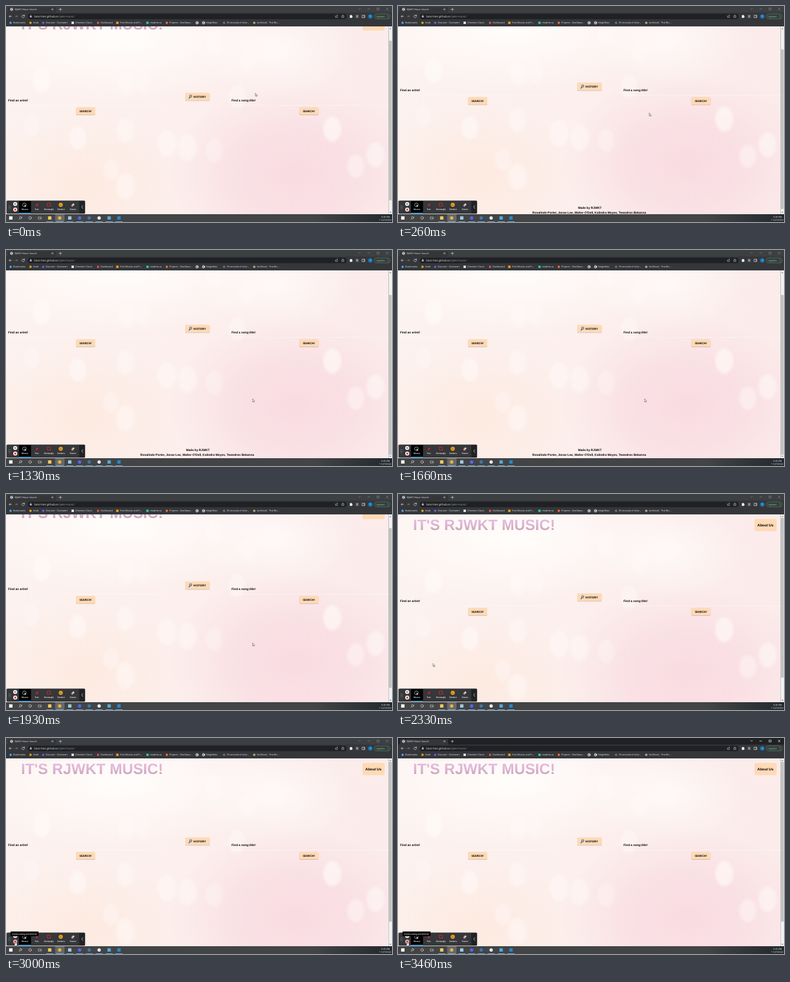
These frames come from a looping animation (640 px wide and 360 px high, 3.53 s). An HTML page:

```html
<!DOCTYPE html>
<html lang="en">
<head>
<meta charset="utf-8">
<title>RJWKT Music Search</title>
<style>
html, body { margin: 0; width: 100%; height: 100%; overflow: hidden; background: #202124; }
svg { display: block; width: 640px; height: 360px; }
text { font-family: "Open Sans", sans-serif; text-rendering: geometricPrecision; white-space: pre; }
.page text { font-family: "Liberation Sans", Arial, sans-serif; font-weight: 700; font-size: 5px; }
.page .btn { font-family: "Open Sans", sans-serif; font-size: 4.6px; letter-spacing: .15px; }
.page .title { font-size: 24.9px; }
.page .about { font-size: 6px; }
.line { fill: none; stroke: #dcdee0; stroke-width: .7; stroke-linecap: round; stroke-linejoin: round; }
.marks text { font-size: 3.85px; fill: #e8eaed; }
.tools text { font-size: 3.4px; font-weight: 600; fill: #fff; text-anchor: middle; }
</style>
</head>
<body>
<svg viewBox="0 0 640 360" xmlns="http://www.w3.org/2000/svg">
  <defs>
    <linearGradient id="base">
      <stop offset="0" stop-color="#fcf2ef"/><stop offset=".45" stop-color="#fcefed"/><stop offset="1" stop-color="#fbebeb"/>
    </linearGradient>
    <radialGradient id="rose"><stop offset="0" stop-color="#f9dbe1"/><stop offset=".5" stop-color="#f9dde2" stop-opacity=".75"/><stop offset="1" stop-color="#f9dfe4" stop-opacity="0"/></radialGradient>
    <radialGradient id="peach"><stop offset="0" stop-color="#fdeae0"/><stop offset="1" stop-color="#fdeae0" stop-opacity="0"/></radialGradient>
    <radialGradient id="glow"><stop offset="0" stop-color="#fffdfb"/><stop offset="1" stop-color="#fffdfb" stop-opacity="0"/></radialGradient>
    <linearGradient id="ink" x2="0" y2="1">
      <stop offset=".1" stop-color="#eabce3"/><stop offset=".5" stop-color="#dab3d2"/><stop offset=".9" stop-color="#c5a2b1"/>
    </linearGradient>
    <linearGradient id="bar"><stop offset=".8" stop-color="#424446"/><stop offset="1" stop-color="#22282d"/></linearGradient>
    <filter id="soft" x="-30%" y="-30%" width="160%" height="160%"><feGaussianBlur stdDeviation="2.2"/></filter>
    <filter id="lift" x="-20%" y="-30%" width="140%" height="180%"><feDropShadow dx="0" dy=".7" stdDeviation=".6" flood-color="#7a5a50" flood-opacity=".45"/></filter>
    <clipPath id="view"><rect y="34" width="634.5" height="313"/></clipPath>
  </defs>

  <g clip-path="url(#view)">
    <g id="page" class="page">
      <rect y="34" width="635" height="356" fill="url(#base)"/>
      <ellipse cx="130" cy="320" rx="190" ry="130" fill="url(#peach)"/>
      <ellipse cx="480" cy="300" rx="210" ry="150" fill="url(#rose)"/>
      <ellipse cx="190" cy="75" rx="290" ry="110" fill="url(#glow)"/>
      <ellipse cx="450" cy="95" rx="130" ry="80" fill="url(#glow)" opacity=".7"/>
      <g id="bokeh" fill="#fffaf8" filter="url(#soft)"></g>
      <text class="title" x="25" y="60.3" fill="url(#ink)">IT'S RJWKT MUSIC!</text>
      <path d="M0 186.7H265M374 186.7H635" stroke="#fff" stroke-width=".8" opacity=".55"/>
      <text x="3.6" y="180.3">Find an artist!</text>
      <text x="373.9" y="180.3">Find a song title!</text>
      <g id="buttons"></g>
      <path d="M304.8 173.2l-1.6 1.8" stroke="#3b3b40" stroke-width="1.1" stroke-linecap="round"/>
      <circle cx="306.3" cy="171.3" r="1.9" fill="#8cc8f0" stroke="#3b3b40" stroke-width=".7"/>
      <g text-anchor="middle">
        <text x="318" y="376.3">Made by RJWKT</text>
        <text x="317" y="383.8">Rosalinde Porter, Jonas Lee, Walter O'Dell, Kalindra Moyes, Tewodros Bekanna</text>
      </g>
    </g>
  </g>

  <rect x="634.5" y="34" width="5.5" height="313" fill="#f1f1f1"/>
  <path d="M635.9 38.2l1.4-1.7 1.4 1.7zM635.9 343l1.4 1.7 1.4-1.7z" fill="#606060"/>
  <rect id="thumb" x="635" y="40" width="4.5" height="266" fill="#c1c1c1"/>

  <rect id="frame" width="640" height="11"/>
  <path d="M1 11q2 0 2-2V4q0-2 2-2H81q2 0 2 2V9q0 2 2 2z" fill="#35363a"/>
  <rect y="11" width="640" height="23" fill="#35363a"/>
  <g class="line">
    <path d="M75.8 4.4l2.4 2.4m0-2.4l-2.4 2.4M88.3 5.6h3.8m-1.9-1.9v3.8"/>
    <path d="M9.3 17.3H5.2m1.8-1.8l-1.8 1.8 1.8 1.8"/>
    <path d="M15 17.3h4.1m-1.8-1.8l1.8 1.8-1.8 1.8" stroke="#85878a"/>
    <path d="M30.4 16a2.2 2.2 0 1 0 .3 1.9M30.7 14.7v1.6h-1.6"/>
  </g>
  <g id="globes" class="line"></g>
  <rect x="36" y="12.7" width="529" height="9.3" rx="4.65" fill="#202124"/>
  <rect x="39.6" y="16.6" width="3" height="2.5" rx=".4" fill="#bdc1c6"/>
  <g class="line">
    <path d="M40.2 16.5v-.7a.9.9 0 0 1 1.8 0v.7" stroke="#bdc1c6" stroke-width=".5"/>
    <path d="M546.3 16.2v2.9h3.6v-1.2M547.4 17.5q.2-1.9 2.4-1.9m-1-1l1.1 1-1.1 1" stroke-width=".5"/>
    <path d="M558.5 14.9l.7 1.7 1.8.1-1.4 1.1.5 1.8-1.6-1-1.6 1 .5-1.8-1.4-1.1 1.8-.1z" stroke-width=".5"/>
    <path d="M580.5 15.7h3.5m-3.5 1.6h2m-2 1.6h2m1.2-2v2.4"/>
    <path d="M590.6 15.3h4.3v4h-4.3zM593.8 15.4v3.8"/>
  </g>
  <path d="M570 15.6h1.2a.8.8 0 0 1 1.6 0h1.2v1.3a.8.8 0 0 1 0 1.6v1.2h-4z" fill="#e8eaed"/>
  <circle cx="604" cy="17.3" r="3.6" fill="#1677b8"/>
  <text x="604" y="18.8" font-size="4" fill="#fff" text-anchor="middle">T</text>
  <rect x="611" y="13.2" width="26" height="8.2" rx="4.1" fill="#333e3b" stroke="#6f9f80" stroke-width=".5"/>
  <text x="614" y="18.8" font-size="4" fill="#8fcaa2">Update</text>
  <path d="M633.4 15.5v.1m0 1.7v.1m0 1.7v.1" stroke="#8fcaa2" stroke-width=".8" stroke-linecap="round"/>
  <text x="14.4" y="7.1" font-size="3.95" fill="#e8eaed">RJWKT Music Search</text>
  <text x="47" y="18.9" font-size="4.5" fill="#f1f3f4">boss-hen.github.io<tspan fill="#9aa0a6">/rjwkt-music/</tspan></text>
  <path id="win" class="line" d="M584.8 4l1.5 1.5 1.5-1.5M599.6 5h3.4M615.5 3.4h3.2v3.2h-3.2zM630.4 3.4l3.2 3.2m0-3.2l-3.2 3.2"/>
  <g id="marks" class="marks"></g>

  <rect y="347" width="640" height="13" fill="url(#bar)"/>
  <rect x="81.5" y="347" width="15.5" height="13" fill="#66696b"/>
  <g id="tasks"></g>
  <g class="line">
    <circle cx="24.4" cy="352.7" r="1.8"/><path d="M23.1 354.1l-1.5 1.6"/>
    <circle cx="40" cy="353.3" r="2.2"/>
    <path d="M53.8 351.8h3.4v3.2h-3.4zM58.6 351.6v.6m0 1.2v1.8" stroke-width=".6"/>
  </g>
  <g font-size="3.8" fill="#fff" text-anchor="end">
    <text x="636.5" y="352.6">9:35 PM</text><text x="639" y="358.4">11/27/2022</text>
  </g>

  <rect x="1" y="324.5" width="130" height="21.5" rx="1.5" fill="#35373a" stroke="#4b4d50" stroke-width=".5"/>
  <path d="M121.5 325H129.5q1.2 0 1.2 1.2V344.3q0 1.2-1.2 1.2H121.5z" fill="#202225"/>
  <rect x="21.5" y="325" width="20" height="20.5" fill="#000"/>
  <rect x="21.5" y="344.6" width="20" height="1.2" fill="#1d9bf0"/>
  <path d="M5 333v.1m0 2.3v.1m0 2.3v.1m2-4.9v.1m0 2.3v.1m0 2.3v.1" stroke="#aaa" stroke-width=".9" stroke-linecap="round"/>
  <circle cx="15.3" cy="330" r="3.3" fill="#fff"/>
  <path d="M14.5 328.7v2.6m1.6-2.6v2.6" stroke="#222" stroke-width=".8"/>
  <circle id="stop" cx="15.3" cy="339.2" r="3.3"/>
  <rect x="13.8" y="337.7" width="3" height="3" rx=".4" fill="#e2342d"/>
  <circle cx="30.5" cy="331.3" r="3" fill="none" stroke="#d9d9d9" stroke-width=".7"/>
  <path d="M30.4 330.5l3.8 3.4-2 .1-.9 1.8z" fill="#fff" stroke="#000" stroke-width=".3"/>
  <path d="M49 333.8l.6-2 2.8-2.6 1.3 1.4-2.7 2.7z" fill="#e5252a"/>
  <path d="M68.3 328.8h5.5v4.8h-5.5z" fill="none" stroke="#e5252a" stroke-width=".9"/>
  <circle cx="90.8" cy="331.3" r="3.4" fill="#f5a623"/>
  <path d="M89.6 330.2v.2m2.4-.2v.2m-2.9 1.6q1.7 1.7 3.4 0" fill="none" stroke="#5a3500" stroke-width=".6" stroke-linecap="round"/>
  <path d="M108.3 332.3l3.3-3.5 2.1 2-3.3 3.4h-1z" fill="#d8d8d8"/>
  <path d="M108.3 332.3l1.5-1.6 2.1 2-1.5 1.5h-1z" fill="#f08a8a"/>
  <path class="line" d="M127.4 332.6l-2 2.4 2 2.4" stroke-width="1"/>
  <g id="tools" class="tools"></g>
  <g id="tip">
    <rect x="7.5" y="322.6" width="46.5" height="7.6" rx=".8" fill="#000"/>
    <text x="30.7" y="327.7" font-size="3.15" font-weight="600" fill="#fff" text-anchor="middle">End Recording (Alt+Shift+R)</text>
  </g>
  <path id="arrow" d="M0 0V5.1L1.2 4 2 5.8 2.8 5.4 2 3.7H3.6z" fill="#fff" stroke="#222" stroke-width=".45"/>
  <path id="hand" d="M-.5 .4Q0-.4 .5 .4V2.4L2.6 3V5L1.9 6.8H-.7L-2 4.4-1.4 3.8-.5 4.5z" fill="#fff" stroke="#222" stroke-width=".4"/>
</svg>
<script>
const $ = id => document.getElementById(id);
const fill = (id, list, draw) => { $(id).innerHTML = list.map(draw).join(""); };

// Soft light spots: x, y, radius, opacity
fill("bokeh", [
  [59, 145, 15, .6], [119, 241, 14, .6], [198, 228, 15, .45], [267, 250, 16, .55], [301, 257, 16, .5],
  [345, 262, 14, .35], [198, 322, 16, .5], [174, 294, 13, .35], [199, 150, 15, .5], [228, 148, 14, .35],
  [541, 226, 15, .65], [580, 288, 14, .45], [613, 269, 15, .55], [383, 172, 14, .45], [345, 82, 16, .4],
  [400, 112, 14, .4], [42, 222, 13, .35]
], ([x, y, r, o]) => `<ellipse cx="${x}" cy="${y}" rx="${r}" ry="${r * 1.4}" opacity="${o}"/>`);

fill("buttons", [
  [591, 41.4, 36.8, 20.5, "About Us", 609.2, 53.8, "about", 3],
  [297, 165.7, 40.6, 12.6, "HISTORY", 321.2, 173.6, "btn", 1.6],
  [116.2, 189.7, 31.8, 12.4, "SEARCH!", 132, 197.5, "btn", 1.6],
  [486.4, 189.7, 31.8, 12.4, "SEARCH!", 502.2, 197.5, "btn", 1.6]
], ([x, y, w, h, label, tx, ty, kind, r]) =>
  `<rect x="${x}" y="${y}" width="${w}" height="${h}" rx="${r}" fill="#fedab6" ${kind === "btn" ? 'filter="url(#lift)"' : ""}/>
   <text class="${kind}" x="${tx}" y="${ty}" text-anchor="middle">${label}</text>`);

fill("globes", [[9.3, 5.6], [316.8, 28], [327.6, 28]], ([x, y]) =>
  `<circle cx="${x}" cy="${y}" r="2.2"/><ellipse cx="${x}" cy="${y}" rx="1" ry="2.2"/><path d="M${x - 2.2} ${y}h4.4"/>`);

// Bookmarks: text x, label, icon colour, round icon
fill("marks", [
  [12, "Bookmarks", "#4a9df0", 1], [45, "Vode", "#e5a00d", 1], [66, "Discover - Overseerr", "#6a5be0", 1],
  [115, "Checkers Chum", "#e8eaed", 0], [157, "Dashboard", "#d8564a", 1], [189, "Free Movies and Fr...", "#f29a1f", 0],
  [239, "readme.so", "#2fbf9b", 0], [271, "Projects - Dashboar...", "#ee6b2f", 1], [332, "NeighMoo"],
  [366, "30 seconds of inter...", "#6b6d72", 1], [416, "SortNook - The Wo...", "#b5a383", 1]
], ([x, label, color, round]) =>
  (color ? `<rect x="${x - 6.4}" y="26" width="4" height="4" rx="${round ? 2 : .3}" fill="${color}"/>` : "") +
  `<text x="${x}" y="29.4">${label}</text>`);

// Taskbar: x, colour, round, running
fill("tasks", [
  [8, "#fff", 0, 0], [72.5, "#f6ca5c", 0, 1], [89, "#e7b43c", 1, 1], [105.7, "#9fc9dc", 0, 1], [122, "#5865f2", 1, 1],
  [138, "#3f78a8", 1, 1], [154.4, "#e9e9ea", 1, 1], [171, "#58a7d8", 0, 1], [187.3, "#2489ca", 0, 1]
], ([x, color, round, open]) =>
  `<rect x="${x - 2.8}" y="350.4" width="5.6" height="5.6" rx="${round ? 2.8 : .3}" fill="${color}"/>` +
  (open ? `<rect x="${x - 6}" y="359.1" width="12" height=".9" fill="#76b9ed"/>` : ""));

fill("tools", ["Mouse", "Pen", "Rectangle", "Stickers", "Eraser"], (name, i) =>
  `<text x="${31.2 + 20 * i}" y="340.4">${name}</text>`);

const LOOP = 3530, STEP = LOOP / 53;
const scrollKeys = [[0, 21], [130, 33], [270, 38], [400, 41], [1800, 41], [1866, 33], [1931, 20], [2000, 8], [2130, 2], [2200, 0]];
const mouseKeys = [[0, 413.3, 145], [560, 420.3, 216.5], [760, 420.3, 216.5], [1200, 408.8, 248],
  [1970, 408.8, 248], [2310, 58, 282.5], [2350, 58, 282.5], [2620, 15.7, 339.3]];
const linear = u => u;
const smooth = u => u * u * (3 - 2 * u);

function at(keys, t, ease) {
  const i = keys.findIndex(k => k[0] > t);
  if (i < 0) return keys[keys.length - 1].slice(1);
  const a = keys[i - 1], b = keys[i], u = ease((t - a[0]) / (b[0] - a[0]));
  return a.slice(1).map((v, j) => v + (b[j + 1] - v) * u);
}

const show = (id, on) => $(id).setAttribute("visibility", on ? "visible" : "hidden");

function render(ms) {
  const t = Math.floor((ms % LOOP + 7) / STEP) % 53 * STEP;
  const [scroll] = at(scrollKeys, t, linear);
  const [x, y] = at(mouseKeys, t, smooth);
  $("page").setAttribute("transform", `translate(0 ${-scroll})`);
  $("thumb").setAttribute("y", 40 + scroll * 35 / 41);
  const hover = t >= 2600;
  for (const id of ["arrow", "hand"]) $(id).setAttribute("transform", `translate(${x} ${y})`);
  show("arrow", !hover);
  show("hand", hover);
  show("tip", t >= 2730);
  $("stop").setAttribute("fill", hover ? "#f3b9b4" : "#fff");
  // The browser window gains focus near the end
  const focused = t >= 3325;
  $("frame").setAttribute("fill", focused ? "#202124" : "#3c4043");
  $("win").style.stroke = focused ? "#fff" : "#85878a";
}

const start = performance.now();
function tick() {
  render(performance.now() - start);
  requestAnimationFrame(tick);
}
tick();
</script>
</body>
</html>
```
